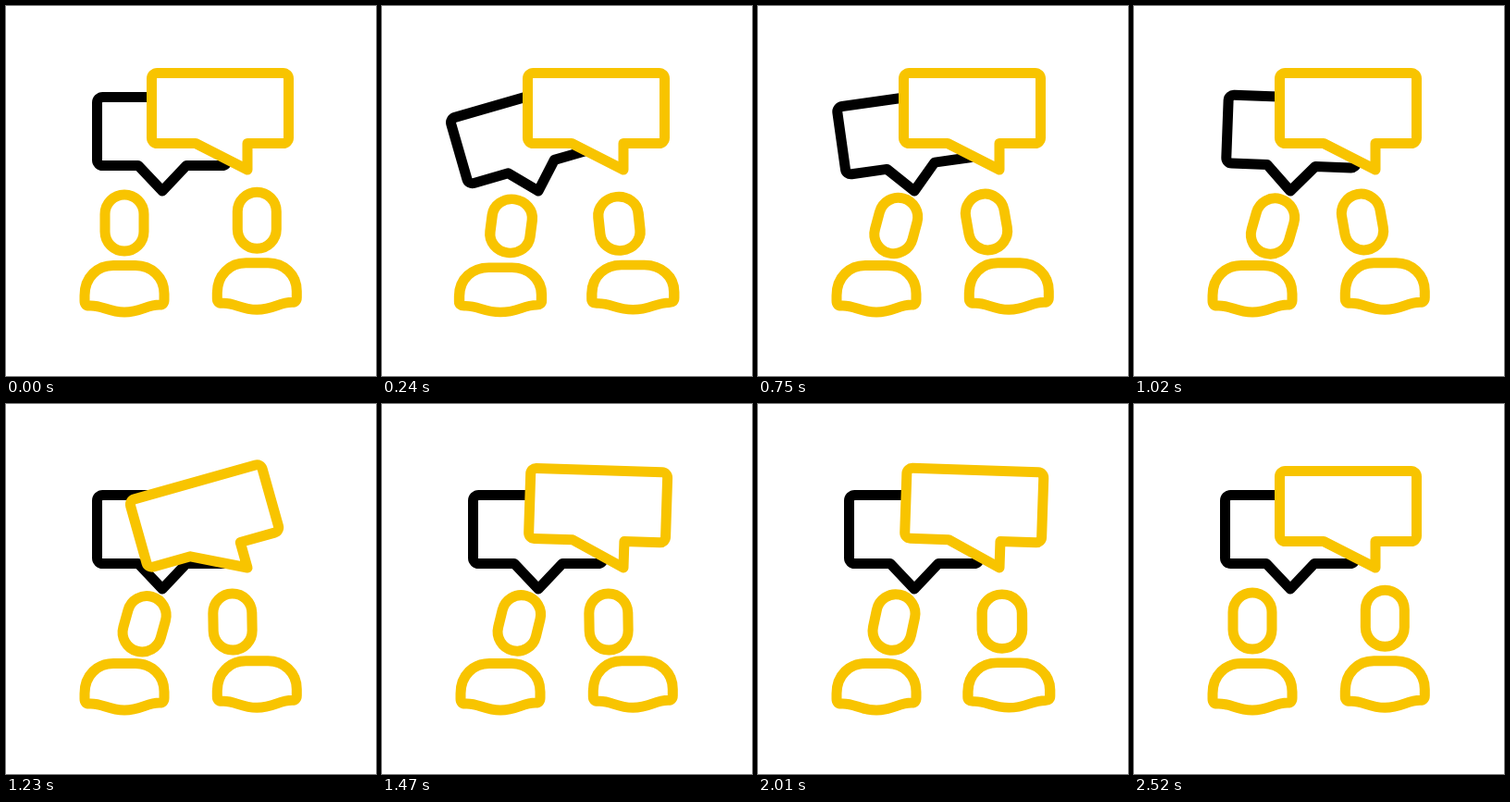
Write an HTML page that moves like this. It is 400 px wide and 400 px high and loops after 3050 ms.

```html
<!DOCTYPE html>
<html lang="en">
<head>
<meta charset="utf-8">
<title>Conversation</title>
<style>
  html, body { margin: 0; width: 100%; height: 100%; overflow: hidden; background: #fff; }
  svg { display: block; width: 100%; height: 100%; }
  .line { fill: none; stroke: #f8c400; stroke-width: 11; stroke-linejoin: round; }
  .dark { stroke: #000; }
  .solid { fill: #fff; }
</style>
</head>
<body>
<svg viewBox="0 0 400 400">
  <defs>
    <rect id="head" x="-21" y="-30.5" width="42" height="61" rx="21"/>
    <path id="body" d="M-43 -18V-12Q-43 -7 -38 -7C-24 -8 -18 0 0 0S24 -8 38 -8Q43 -8 43 -13V-20
      C43 -38 29 -50.5 12 -50.5H-12C-29 -50.5 -43 -38 -43 -18Z"/>
  </defs>
  <path id="dark" class="line dark"/>
  <path id="gold" class="line solid"/>
  <use id="bodyL" class="line" href="#body"/>
  <use id="bodyR" class="line" href="#body"/>
  <use id="headL" class="line" href="#head"/>
  <use id="headR" class="line" href="#head"/>
</svg>
<script>
  const LOOP = 3050, END = 2520, STEP = 30, MOVE = 420;
  const { PI, sin, cos, min, max } = Math;

  const set = (id, name, value) => document.getElementById(id).setAttribute(name, value);
  const place = (id, value) => set(id, "transform", value);

  // Rounded box from (x, y) with a tail from x1 and x2 on the lower edge to the tip.
  function bubble(id, x, y, w, h, x1, x2, tipX, tipY) {
    const r = 6, arc = (dx, dy) => `a6 6 0 0 1 ${dx} ${dy}`;
    set(id, "d", `M${x1} ${y + h}H${x + r}${arc(-r, -r)}V${y + r}${arc(r, -r)}` +
      `H${x + w - r}${arc(r, r)}V${y + h - r}${arc(-r, r)}H${x2}L${tipX} ${tipY}Z`);
  }

  const part = (t, start, length) => min(1, max(0, (t - start) / length));
  const ease = p => 0.5 - 0.5 * cos(PI * p);
  const hump = p => sin(PI * p);

  // Damped rocking that quickens a little as it fades.
  function swing(t, start) {
    const u = max(0, t - start);
    return -24 * max(0, 1 - u / 1140) * sin(PI * (u / 335) ** 1.17);
  }

  // Lean in at the start of the loop, lean back at the given time.
  function lean(t, back) {
    const p = part(t, 0, MOVE), q = part(t, back, MOVE);
    return { amount: ease(p) - ease(q), squash: hump(p) + hump(q) };
  }

  function person(side, x, y, tilt, bodyX, bodyY, k) {
    const squash = `scale(${1 + 0.035 * k} ${1 - 0.045 * k})`;
    place("head" + side, `translate(${x} ${y + 2.5 * k}) rotate(${tilt}) ${squash}`);
    place("body" + side, `translate(${bodyX} ${bodyY}) ${squash}`);
  }

  function draw(now) {
    const ms = now % LOOP;
    const t = min(END, ms - ms % STEP);
    place("dark", `rotate(${swing(t, 0)} 169 200)`);
    place("gold", `rotate(${swing(t, 1125)} 261 177)`);

    const left = lean(t, 2100), a = left.amount;
    const sway = hump(part(t, MOVE, 1230));
    person("L", 128 + 19 * a + 3 * sway, 234.5 + 1.5 * a + 2 * sway, 12 * a + 4 * sway,
      128, 331, left.squash);

    const right = lean(t, 1740), b = right.amount;
    const upright = ease(part(t, 1020, 210));
    person("R", 271.3 - (24.3 + 2 * upright) * b, 231.8 + (1.7 + 2 * upright) * b,
      (9 * upright - 10) * b, 271.3, 328.3, right.squash);
  }

  bubble("dark", 98.5, 98.5, 141, 74, 143, 195, 169, 200);
  bubble("gold", 157.5, 72.5, 148, 76, 205, 261, 261, 177);

  let start;
  function tick(now) {
    if (start === undefined) start = now;
    draw(now - start);
    requestAnimationFrame(tick);
  }
  draw(0);
  requestAnimationFrame(tick);
</script>
</body>
</html>
```
